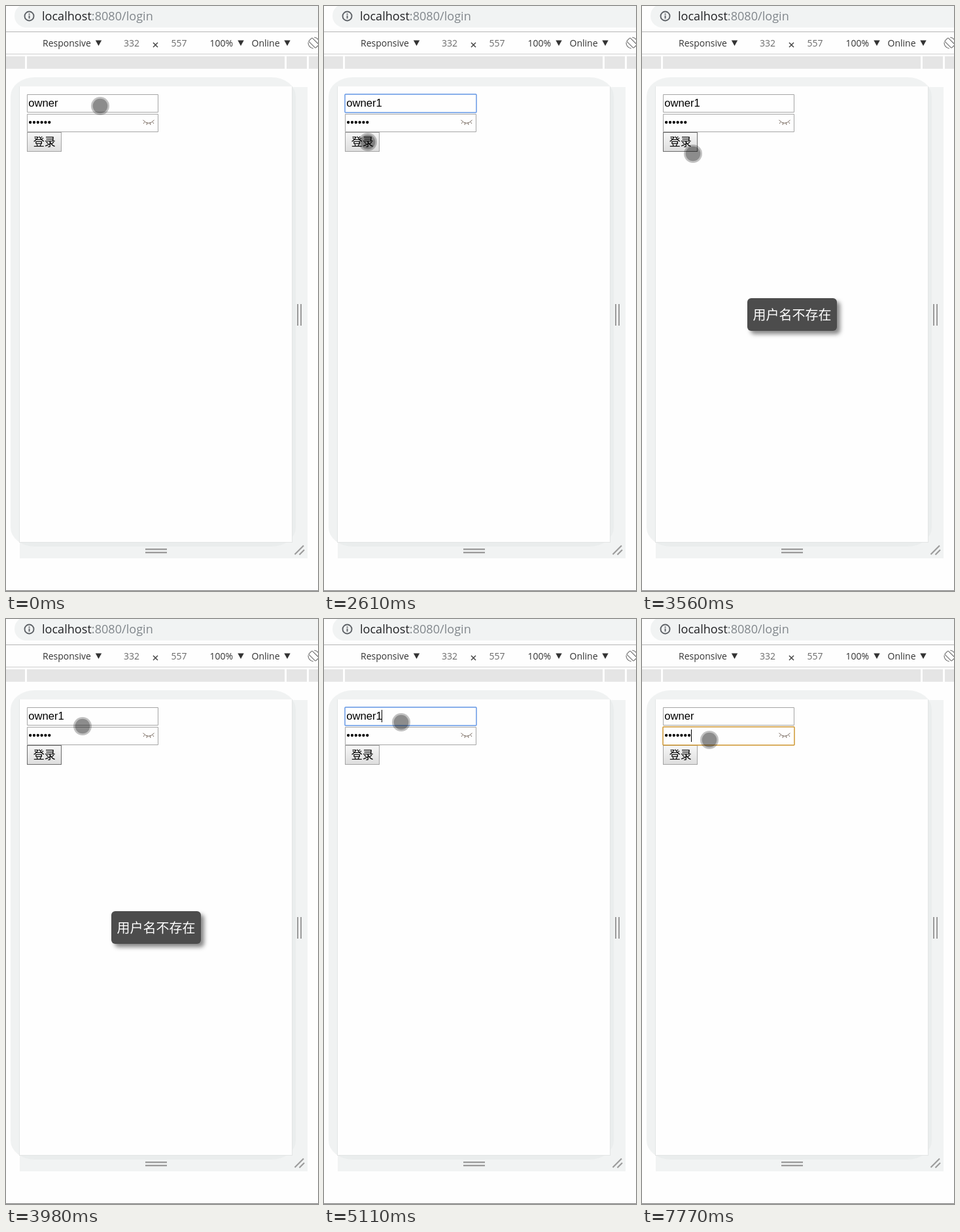
An HTML page with a canvas for the animation above (8000 ms loop, 477 by 895 pixels).

```html
<!DOCTYPE html>
<html lang="zh">
<head>
<meta charset="utf-8">
<title>Login form</title>
<style>
  html, body { margin: 0; width: 100%; height: 100%; overflow: hidden; background: #fefefe; }
  canvas { display: block; }
</style>
</head>
<body>
<canvas id="stage" width="477" height="895"></canvas>
<script>
const ctx = document.getElementById('stage').getContext('2d');
const LOOP = 8000;
const STEP = 120;   // the screen refreshes in steps while the pointer moves
const BLINK = 530;  // half period of the caret
const UI = '"Open Sans", "Noto Sans", sans-serif';
const FIELD = '16.67px "Liberation Sans", Arial, sans-serif';
const CJK = '"Noto Sans CJK SC", "Noto Sans CJK", sans-serif';
const PAGE = '#fefefe';
const GRIP = '#9b9b9b';
const USER = 'owner';

const focusUser = 840, typeDigit = 1940, press = 3010, release = 3130;
const toastIn = 3250, toastOut = 4220;
const refocusUser = 5110, eraseDigit = 6360, focusPass = 6940, typeDot = 7770;
const caretResets = [focusUser, typeDigit, refocusUser, eraseDigit, focusPass, typeDot];

const restPoint = { x: 144, y: 153 };
const moves = [
  { at: 2350, steps: 5, x: 62, y: 212 },
  { at: 3560, steps: 1, x: 78, y: 226 },
  { at: 3700, steps: 5, x: 120, y: 160 },
  { at: 4530, steps: 1, x: 112, y: 175 },
  { at: 4680, steps: 3, x: 118, y: 158 },
  { at: 6510, steps: 1, x: 114, y: 162 },
  { at: 6630, steps: 3, x: 103, y: 185 }
];

const within = (t, a, b) => t >= a && t < b;
const easeOut = p => 1 - (1 - p) ** 3;

function pointerAt(t) {
  let { x, y } = restPoint;
  for (const move of moves) {
    if (t < move.at) break;
    const step = Math.floor((t - move.at) / STEP) + 1;
    const p = easeOut(Math.min(1, step / move.steps));
    x += (move.x - x) * p;
    y += (move.y - y) * p;
  }
  return { x: Math.round(x), y: Math.round(y) };
}

function caretVisible(t) {
  const reset = caretResets.findLast(time => t >= time);
  return Math.floor((t - reset) / BLINK) % 2 === 0;
}

function rect(x, y, w, h, color) {
  ctx.fillStyle = color;
  ctx.fillRect(x, y, w, h);
}

function rounded(x, y, w, h, r) {
  ctx.beginPath();
  ctx.roundRect(x, y, w, h, r);
}

function line(x1, y1, x2, y2, width, color) {
  ctx.strokeStyle = color;
  ctx.lineWidth = width;
  ctx.beginPath();
  ctx.moveTo(x1, y1);
  ctx.lineTo(x2, y2);
  ctx.stroke();
}

function disc(x, y, r, color) {
  ctx.fillStyle = color;
  ctx.beginPath();
  ctx.arc(x, y, r, 0, 7);
  ctx.fill();
}

function text(str, x, y, font, color) {
  ctx.font = font;
  ctx.fillStyle = color;
  ctx.fillText(str, x, y);
  return x + ctx.measureText(str).width;
}

function addressBar() {
  ctx.fillStyle = '#f1f3f3';
  rounded(13, -3, 500, 36, 18);
  ctx.fill();
  ctx.strokeStyle = '#5f6368';
  ctx.lineWidth = 1.9;
  ctx.beginPath();
  ctx.arc(35.5, 15.5, 7, 0, 7);
  ctx.stroke();
  rect(34.6, 14.5, 1.9, 4.8, '#5f6368');
  rect(34.6, 11.5, 1.9, 1.9, '#5f6368');
  const font = '18.1px ' + UI;
  const end = text('localhost', 55, 22, font, '#202124');
  text(':8080/login', end, 22, font, '#80868b');
}

function dropArrow(x) {
  ctx.fillStyle = '#333';
  ctx.beginPath();
  ctx.moveTo(x - 4.7, 52.5);
  ctx.lineTo(x + 4.7, 52.5);
  ctx.lineTo(x, 61);
  ctx.fill();
}

function rotateIcon() {
  ctx.save();
  ctx.translate(470.5, 56.5);
  ctx.rotate(-Math.PI / 4);
  ctx.strokeStyle = '#6e6e6e';
  ctx.lineWidth = 1.1;
  rounded(-3.8, -7.5, 7.6, 15, 1.5);
  ctx.stroke();
  for (const side of [0, Math.PI]) {
    ctx.beginPath();
    ctx.arc(0, 0, 8.5, side - .7, side + .9);
    ctx.stroke();
  }
  ctx.restore();
}

function deviceBar() {
  rect(0, 39, 477, 1, '#b4b4b4');
  rect(0, 73, 477, 1, '#cfcfcf');
  const label = (str, x, color = '#333') => text(str, x, 62, '14px ' + UI, color);
  label('Responsive', 56);
  label('332', 180, '#6a6a6a');
  label('557', 252.5, '#6a6a6a');
  label('100%', 311.5);
  label('Online', 375.5);
  line(225, 56, 232, 63, 1.5, '#444');
  line(232, 56, 225, 63, 1.5, '#444');
  [141.5, 359, 430].forEach(dropArrow);
  rotateIcon();
  rect(0, 77, 477, 19, '#e5e5e5');
  for (const gap of [29, 426, 460]) rect(gap, 77, 3, 19, PAGE);
}

function device() {
  rect(437, 124, 24, 721, '#f1f3f3');
  rect(21, 821, 416, 24, '#f1f3f3');
  ctx.fillStyle = 'rgba(228,232,231,.5)';
  rounded(7, 109, 436, 718, [{ x: 37, y: 29 }]);
  ctx.fill();
  rect(20, 123, 418, 698, '#e3e5e5');
  rect(21, 123, 416, 697, PAGE);
  for (const shift of [0, 5]) {
    rect(445 + shift, 456, 2, 33, GRIP);
    rect(213, 830 + shift, 33, 2.3, GRIP);
  }
  line(441.5, 839, 455, 825.5, 2.2, GRIP);
  line(448.5, 839.5, 456, 832, 2.2, GRIP);
  rect(0, 894, 477, 1, '#777');
}

function field(y, ring) {
  ctx.strokeStyle = ring || '#a5a5a5';
  ctx.lineWidth = ring ? 1.45 : 1;
  if (ring) rounded(32, y, 201, 28, 1);
  else rounded(32.5, y + .5, 200, 27, 0);
  ctx.stroke();
}

function maskDots(count, y) {
  const pitch = 5.83;
  for (let i = 0; i < count; i++) disc(34.2 + pitch * (i + .5), y, 2.15, '#000');
  return 34.2 + pitch * count;
}

function eye() {
  const color = '#77695f';
  ctx.strokeStyle = color;
  ctx.lineWidth = 1;
  ctx.beginPath();
  ctx.moveTo(209.5, 174.5);
  ctx.quadraticCurveTo(218, 184, 226.5, 174.5);
  ctx.stroke();
  for (const side of [-1, 1]) {
    line(218 + side * 2, 179, 218 + side * 3, 182, 1, color);
    line(218 + side * 6, 177.5, 218 + side * 8, 180, 1, color);
  }
}

function button(pressed, focused) {
  const fill = ctx.createLinearGradient(0, 193, 0, 223);
  fill.addColorStop(0, pressed ? '#dcdcdc' : '#f7f7f7');
  fill.addColorStop(1, pressed ? '#f2f2f2' : '#dddddd');
  rect(32, 193, 53, 30, fill);
  ctx.strokeStyle = focused ? '#6a6a6a' : '#a3a3a3';
  ctx.lineWidth = 1;
  ctx.strokeRect(32.5, 193.5, 52, 29);
  text('登录', 41.8, 214.3, '300 17px ' + CJK, '#000');
}

function toast() {
  ctx.save();
  ctx.shadowColor = '#888';
  ctx.shadowOffsetX = ctx.shadowOffsetY = 5;
  ctx.shadowBlur = 6.25;
  ctx.fillStyle = '#4c4c4c';
  rounded(161, 447, 137, 50, 6);
  ctx.fill();
  ctx.restore();
  text('用户名不存在', 169.5, 480, '300 20px ' + CJK, '#fff');
}

function pointer({ x, y }, pressed) {
  if (pressed) {
    const glow = ctx.createRadialGradient(x, y, 2, x, y, 14);
    glow.addColorStop(0, 'rgba(0,0,0,.65)');
    glow.addColorStop(.65, 'rgba(0,0,0,.42)');
    glow.addColorStop(1, 'rgba(0,0,0,0)');
    disc(x, y, 14, glow);
  } else {
    disc(x, y, 14, 'rgba(0,0,0,.24)');
    disc(x, y, 11.3, 'rgba(0,0,0,.27)');
  }
}

function draw(t) {
  const userFocus = within(t, focusUser, press) || within(t, refocusUser, focusPass);
  const passFocus = t >= focusPass;
  const pressed = within(t, press, release);

  rect(0, 0, 477, 895, PAGE);
  addressBar();
  deviceBar();
  device();

  const name = USER + (within(t, typeDigit, eraseDigit) ? '1' : '');
  field(135, userFocus && '#6295e4');
  const nameEnd = text(name, 34.2, 154, FIELD, '#000');
  const dotsEnd = maskDots(t >= typeDot ? 7 : 6, 178);
  eye();
  button(pressed, within(t, release, refocusUser));
  field(165, passFocus && '#cd942c');
  if ((userFocus || passFocus) && caretVisible(t)) {
    rect(Math.floor(passFocus ? dotsEnd : nameEnd), passFocus ? 169 : 139, 1, 19, '#000');
  }
  if (within(t, toastIn, toastOut)) toast();
  pointer(pointerAt(t), pressed);
}

const start = performance.now();
function tick() {
  draw((performance.now() - start) % LOOP);
  requestAnimationFrame(tick);
}
tick();
</script>
</body>
</html>
```
